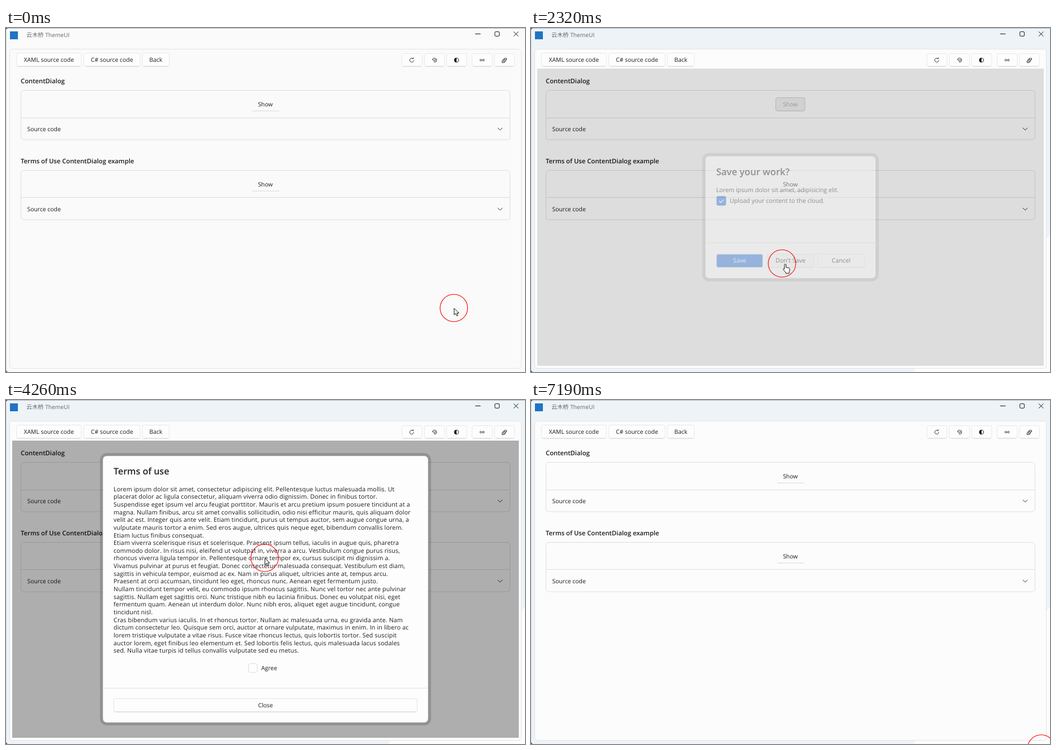
Recreate the animation shown at these times as an HTML page. Size 917 px wide and 610 px high, loop 7.35 s.

```html
<!DOCTYPE html>
<html lang="en">
<head>
<meta charset="utf-8">
<title>Content dialogs</title>
<style>
html, body { margin: 0; width: 100%; height: 100%; overflow: hidden; background: #fafafa; }
svg { display: block; width: 917px; height: 610px; }
text {
  font: 10.4px "Open Sans", "Noto Sans", "Noto Sans CJK SC", "Noto Sans CJK", sans-serif;
  fill: #1c1c1c; text-rendering: geometricPrecision; white-space: pre;
}
.mid { text-anchor: middle; }
.head { font-size: 11.25px; font-weight: 600; }
.title { font-size: 16.05px; font-weight: 600; fill: #222; }
.app { font-size: 10.2px; fill: #666; }
.body { font-size: 10.7px; letter-spacing: .15px; }
.error { font-size: 12.66px; fill: #f00; }
.line { fill: none; stroke: #333; stroke-width: 1; }
</style>
</head>
<body>
<svg id="stage" viewBox="0 0 917 610"></svg>
<script>
const LOOP = 7350;
const terms = `Lorem ipsum dolor sit amet, consectetur adipiscing elit. Pellentesque luctus malesuada mollis. Ut
placerat dolor ac ligula consectetur, aliquam viverra odio dignissim. Donec in finibus tortor.
Suspendisse eget ipsum vel arcu feugiat porttitor. Mauris et arcu pretium ipsum posuere tincidunt at a
magna. Nullam finibus, arcu sit amet convallis sollicitudin, odio nisi efficitur mauris, quis aliquam dolor
velit ac est. Integer quis ante velit. Etiam tincidunt, purus ut tempus auctor, sem augue congue urna, a
vulputate mauris tortor a enim. Sed eros augue, ultrices quis neque eget, bibendum convallis lorem.
Etiam luctus finibus consequat.
Etiam viverra scelerisque risus et scelerisque. Praesent ipsum tellus, iaculis in augue quis, pharetra
commodo dolor. In risus nisi, eleifend ut volutpat in, viverra a arcu. Vestibulum congue purus risus,
rhoncus viverra ligula tempor in. Pellentesque ornare tempor ex, cursus suscipit mi dignissim a.
Vivamus pulvinar at purus et feugiat. Donec consectetur malesuada consequat. Vestibulum est diam,
sagittis in vehicula tempor, euismod ac ex. Nam in purus aliquet, ultricies ante at, tempus arcu.
Praesent at orci accumsan, tincidunt leo eget, rhoncus nunc. Aenean eget fermentum justo.
Nullam tincidunt tempor velit, eu commodo ipsum rhoncus sagittis. Nunc vel tortor nec ante pulvinar
sagittis. Nullam eget sagittis orci. Nunc tristique nibh eu lacinia finibus. Donec eu volutpat nisi, eget
fermentum quam. Aenean ut interdum dolor. Nunc nibh eros, aliquet eget augue tincidunt, congue
tincidunt nisl.
Cras bibendum varius iaculis. In et rhoncus tortor. Nullam ac malesuada urna, eu gravida ante. Nam
dictum consectetur leo. Quisque sem orci, auctor at ornare vulputate, maximus in enim. In in libero ac
lorem tristique vulputate a vitae risus. Fusce vitae rhoncus lectus, quis lobortis tortor. Sed suscipit
auctor lorem, eget finibus leo elementum et. Sed lobortis felis lectus, quis malesuada lacus sodales
sed. Nulla vitae turpis id tellus convallis vulputate sed eu metus.`.split("\n");

// y is the middle of the capitals
const text = (x, y, s, cls = "", id = "") =>
  `<text x="${x}" y="${y + 3.8}" class="${cls}" ${id && `id="${id}"`}>${s}</text>`;
const box = (x, y, w, h, r, attrs) =>
  `<rect x="${x}" y="${y}" width="${w}" height="${h}" rx="${r}" ${attrs}/>`;
const line = (d, attrs = "") => `<path d="${d}" class="line" ${attrs}/>`;
const check = (x, y) => box(x, y, 16.5, 16.5, 3, 'fill="#2f78dc"') +
  line(`M${x + 4.5} ${y + 8.5}l2.8 2.7 5-5.2`, 'style="stroke:#fff;stroke-width:1.3"');

function button(x, y, w, h, label, id = "") {
  return box(x, y, w, h, 3, `fill="#fdfdfd" stroke="#e8e8e8" ${id && `id="${id}"`}`) +
    line(`M${x + 2} ${y + h}h${w - 4}`, 'style="stroke:#d6d6d6"') +
    text(x + w / 2, y + h / 2 - .2, label, "mid", id && id + "Text");
}

function example(y, mid, label, id) {
  return text(26, y - 16.5, label, "head") +
    box(26.5, y, 864, 87.5, 5, 'fill="none" stroke="#dedede"') +
    line(`M27 ${mid}h863`, 'style="stroke:#dedede"') +
    box(432.5, y + 13, 51.5, 23.5, 3, `id="${id}" fill="none"`) +
    line(`M435 ${y + 36.5}h48`, 'style="stroke:#d8d8d8"') +
    text(458.3, y + 24.5, "Show", "mid", id + "Text") +
    text(37.5, y + 68.5, "Source code") +
    line(`M869 ${y + 66.5}l4.2 4 4.2-4`);
}

function dialog(id, x, y, w, h, split, inner) {
  return `<g id="${id}">` +
    box(x - 5, y - 5, w + 10, h + 10, 12, 'fill="#000" opacity=".16"') +
    box(x, y, w, h, 7, 'fill="#fdfdfd" stroke="#9b9b9b" stroke-width=".6"') +
    line(`M${x} ${split}h${w}`, 'style="stroke:#dcdcdc"') + inner + "</g>";
}

const icons =
  line("M719.2 54.4A3.5 3.5 0 1 0 720.4 57M717.6 54.3h2.2v-1.9") +
  line("M753.4 56.4a3.8 3.6 0 1 1 3.6 4.2q-1.2-.6-.3-1.8 .9-1.6-.9-1.8zM757 55.6l2 .9v1.8") +
  '<circle cx="796" cy="57" r="3.8" class="line"/><path d="M796 53a4 4 0 0 0 0 8z" fill="#111"/>' +
  line("M841.2 57q-3.6-3.4-3.6 0t3.6 0q3.6-3.4 3.6 0t-3.6 0") +
  line("M880.5 53.8h4v2.8h-4zM876.5 58.4h3.6v3h-3.6zM878.2 58v-2.6h2.2M880.2 60h2v-3");

const windowButtons = line("M829 10.5h9.5", 'style="stroke:#111"') +
  box(863.8, 6.6, 7.8, 7.8, 1.5, 'class="line" style="stroke:#111"') +
  line("M897 6.4l8.4 8.4M905.4 6.4l-8.4 8.4", 'style="stroke:#111"');

stage.innerHTML =
  '<rect width="917" height="610" fill="#fafafa"/>' +
  '<g id="active"><path d="M0 0H917V367L674 610H0z" fill="#eef3f8"/><path d="M917 367V610H674z" fill="#fcfcfc"/></g>' +
  line("M0 .5H917", 'style="stroke:#aab4be"') +
  line("M.5 0V610", 'style="stroke:#d5dbe0"') +
  '<path d="M0 0h3L0 3zM0 610v-3l3 3z" fill="#555"/>' +
  box(7, 6, 14, 14, 0, 'fill="#1f74c4"') +
  text(36, 12.4, "云木桥 ThemeUI", "app") + windowButtons +
  box(6.5, 37.5, 904, 566, 5, 'id="panel" fill="#fafafa" stroke="#e1e3e5"') +
  button(18.5, 44.5, 114.5, 23.5, "XAML source code") +
  button(137.5, 44.5, 99.5, 23.5, "C# source code") +
  button(241, 44.5, 47.5, 23.5, "Back") +
  [699.5, 739.5, 778.5, 823.5, 863].map(x => button(x, 45.5, 35.5, 22.5, "")).join("") + icons +
  example(110.5, 159.5, "ContentDialog", "show1") +
  example(252.5, 300.5, "Terms of Use ContentDialog example", "show2") +
  box(11, 72, 895, 527, 0, 'id="dim" fill="#000"') +
  dialog("saveDialog", 312, 230, 293, 211, 379.5,
    text(331, 259, "Save your work?", "title") +
    text(331, 288.5, "Lorem ipsum dolor sit amet, adipisicing elit.") +
    check(331.5, 299) + text(354, 307, "Upload your content to the cloud.") +
    button(331.5, 399, 79.5, 23, "Save", "save") +
    button(418, 399, 81, 23, "Don't Save", "skip") +
    button(505, 399, 80.5, 23, "Cancel", "cancel")) +
  dialog("termsDialog", 171, 99, 575, 473, 511,
    text(190, 128, "Terms of use", "title") +
    '<clipPath id="view"><rect x="188" y="151" width="540" height="327"/></clipPath><g clip-path="url(#view)"><g id="terms">' +
    terms.map((s, i) => text(190, 157.8 + i * 13.65, s, "body")).join("") + "</g></g>" +
    '<g id="warning">' + text(454, 444.2, "You must accept these terms of use to continue", "mid error") +
    box(720, 176, 3, 300, 1.5, 'fill="#cfcfcf"') + "</g>" +
    box(428.5, 467.5, 15.5, 15.5, 3, 'fill="#fefefe" stroke="#dadada"') +
    `<g id="agreed">${check(428, 467)}</g>` + text(451, 475, "Agree") +
    button(190.5, 529.5, 536, 23.5, "Close", "shut")) +
  `<g id="pointer"><circle r="24.3" fill="none" stroke="#f00" stroke-width="1.1"/>
   <g fill="#fff" stroke="#111" stroke-width="1" stroke-linejoin="round">
   <path id="arrow" d="M.5 .5V12.2L3.2 9.7 5.2 14 7.2 13 5.3 9H9z"/>
   <path id="hand" d="M4.4 9.5V2.6a1.4 1.4 0 0 1 2.8 0V7l4.6 .9q2 .5 2 2.3 0 2.6-1.2 4.6v2.7H6.6v-1.6Q4.6 14 2.6 11.2q-1-1.4 .1-1.9 .9-.3 1.7 .6z"/></g></g>`;

const el = id => document.getElementById(id);
const set = (id, attrs) => { for (const k in attrs) el(id).setAttribute(k, attrs[k]); };
const show = (id, on) => set(id, { visibility: on ? "inherit" : "hidden" });
const clamp = v => Math.max(0, Math.min(1, v));

// time, x, y of the pointer
const path = [
  [0, 791.3, 496.5], [50, 791.3, 496.5], [650, 459.5, 137.5], [1020, 459.5, 137.5],
  [1450, 491.5, 410.3], [1498, 491.5, 410.3], [1600, 552, 411], [1720, 560, 412],
  [2010, 443.5, 417.5], [2400, 443.5, 417.5], [2720, 404.8, 421], [2775, 404.8, 421],
  [2940, 552.5, 417.5], [2990, 552.5, 417.5], [3500, 458.5, 278], [4200, 457, 280],
  [4550, 457, 280], [4950, 464, 549], [5200, 464.8, 538.5], [5330, 464.8, 538.5],
  [5560, 436.5, 477], [5690, 436.5, 477], [5940, 478.5, 536.8], [6180, 478.5, 536.8],
  [6580, 898, 613], [6840, 898, 613], [7190, 901.5, 618], [LOOP, 901.5, 618]
];

function pointerAt(t) {
  const i = path.findIndex(p => p[0] > t);
  const [a, b] = [path[i - 1], path[i]];
  const u = (t - a[0]) / (b[0] - a[0]), k = u * u * (3 - 2 * u);
  return [a[1] + (b[1] - a[1]) * k, a[2] + (b[2] - a[2]) * k];
}

function pose(id, t, from, to) {
  const grow = 1 - (1 - clamp((t - from) / 250)) ** 3;
  const fade = clamp((t - to) / 170);
  const alpha = grow * (1 - fade), scale = 1.05 - .05 * grow + .05 * fade;
  show(id, alpha > 0);
  set(id, {
    opacity: alpha,
    transform: `translate(458.5 335.5) scale(${scale}) translate(-458.5 -335.5)`
  });
  return alpha;
}

const hits = [
  ["show1", 433, 123, 51, 24], ["show2", 433, 265, 51, 24],
  ["save", 331, 399, 80, 23], ["skip", 418, 399, 81, 23], ["cancel", 505, 399, 81, 23],
  ["shut", 190, 529, 537, 24], ["", 428, 467, 52, 17]
];

function draw(t) {
  const a1 = pose("saveDialog", t, 780, 2220), a2 = pose("termsDialog", t, 3740, 6070);
  set("dim", { opacity: .31 * Math.max(a1, a2) });
  show("active", t >= 650);
  set("panel", { fill: t < 650 ? "#fafafa" : "#fcfcfc" });

  const [x, y] = pointerAt(t);
  set("pointer", { transform: `translate(${x} ${y})` });
  let over = false;
  hits.forEach(([id, left, top, w, h], i) => {
    const live = i < 2 ? !a1 && !a2 : i < 5 ? a1 > 0 : a2 > 0;
    const hot = live && x >= left && x <= left + w && y >= top && y <= top + h;
    over = over || hot;
    if (!id) return;
    const idle = i < 2 ? "none" : id === "save" ? "#2f78dc" : "#fdfdfd";
    set(id, { fill: hot ? (id === "save" ? "#4586df" : "#f8f8f8") : idle });
  });
  show("hand", over);
  show("arrow", !over);

  el("saveText").style.fill = "#fff";
  if (a1) set("show1", { fill: "#efefef", stroke: "#cecece" });
  else set("show1", { stroke: "none" });
  el("show1Text").style.fill = a1 ? "#aeaeae" : "";

  const warned = t >= 5190;
  show("warning", warned);
  set("terms", { transform: `translate(0 ${warned ? -14.6 : 0})` });
  show("agreed", t >= 5650);
  const first = t >= 5150 && t < 5330, pressed = first || t >= 5900;
  if (pressed) set("shut", { fill: "#eaeaea" });
  set("shut", { stroke: pressed ? "#dedede" : "#e4e4e4" });
  el("shutText").style.fill = first ? "#b8b8b8" : pressed ? "#999" : "";
}

const start = performance.now();
function tick() {
  draw((performance.now() - start) % LOOP);
  requestAnimationFrame(tick);
}
tick();
</script>
</body>
</html>
```
